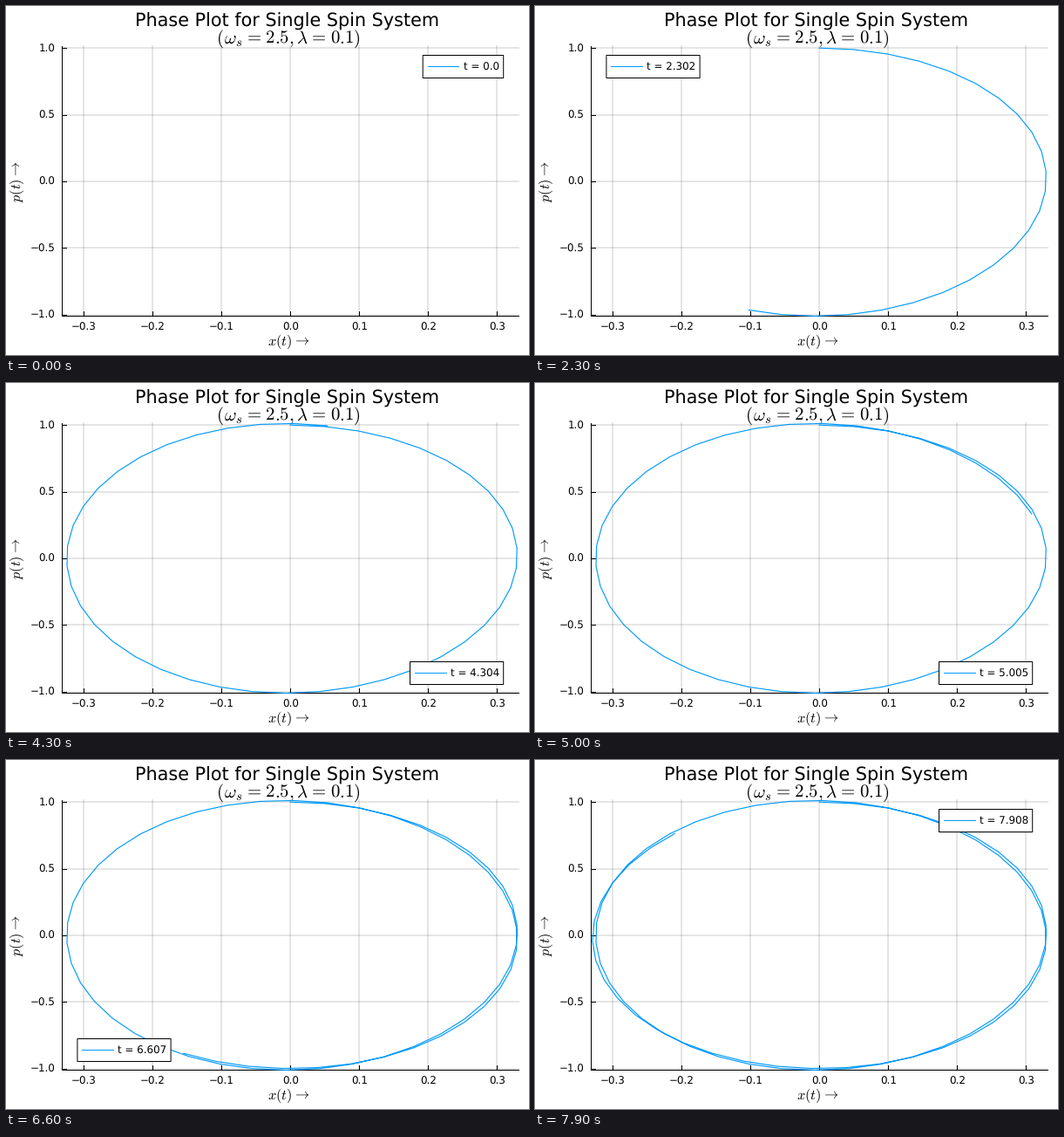
Recreate the animation shown at these times as a matplotlib script. Size 600 px wide and 400 px high, loop 8000 ms.

```python
import numpy as np
import matplotlib.pyplot as plt
from matplotlib.animation import FuncAnimation
from matplotlib.patches import Rectangle

FRAMES, INTERVAL = 80, 100
DT = 100 / 999
BLUE = "#009afa"
PX = 0.72  # points per pixel at 100 dpi
SMALL, MEDIUM, LARGE = 11.85 * PX, 16.3 * PX, 20.74 * PX
LEFT, RIGHT, TOP, BOTTOM = 64, 588, 46, 355

plt.rcParams["font.family"] = "DejaVu Sans"
plt.rcParams["mathtext.fontset"] = "cm"
plt.rcParams["text.hinting"] = "none"


def to_x(x):
    return 326.25 + 790 * x


def to_y(p):
    return 200.9 - 152.7 * p


def orbit(t):
    """Oscillator at 1.5 rad/s with a weak response at the spin frequency."""
    x = 0.328 * np.sin(1.5 * t) + 0.0031 * np.sin(2.5 * t)
    p = 1.008 * np.cos(1.5 * t) - 0.008 * np.cos(2.5 * t)
    return to_x(x), to_y(p)


fig = plt.figure(figsize=(6, 4), dpi=100, facecolor="white")
ax = fig.add_axes([0, 0, 1, 1])
ax.set_xlim(0, 600)
ax.set_ylim(400, 0)
ax.axis("off")


def line(xs, ys, width=1.0, color="black", **kw):
    return ax.plot(xs, ys, color=color, lw=width * PX, **kw)[0]


def label(x, y, text, size, ha="center", **kw):
    return ax.text(x, y, text, size=size, ha=ha, va="baseline", **kw)


def number(v):
    return f"{v:.1f}".replace("-", "\u2212")


# Grid, ticks and tick labels
for v in np.arange(-3, 4) / 10:
    x = to_x(v)
    line([x, x], [TOP, BOTTOM], 2, alpha=0.1, zorder=1)
    line([x, x], [BOTTOM, BOTTOM - 5], zorder=2)
    label(x, 371.6, number(v), SMALL)
for v in np.arange(-2, 3) / 2:
    y = to_y(v)
    line([LEFT, RIGHT], [y, y], 2, alpha=0.1, zorder=1)
    line([LEFT, LEFT + 5], [y, y], zorder=2)
    label(56.5, y + 4.3, number(v), SMALL, ha="right")
line([LEFT, LEFT], [TOP, BOTTOM], zorder=2)
line([LEFT, RIGHT], [BOTTOM, BOTTOM], zorder=2)

# Titles
GAP = r"\hspace{0.08}"
EQ = GAP + "=" + GAP
label(322.3, 24, "Phase Plot for Single Spin System", LARGE)
label(324.2, 42.8, rf"$({GAP}\omega_s{EQ}2.5, \lambda{EQ}0.1)$", LARGE)
label(300.5, 389, r"$x(t)\hspace{0.04}\rightarrow$", MEDIUM, ha="left")
label(16.5, 224.8, r"$p(t)\rightarrow$", MEDIUM, ha="left",
      rotation=90, rotation_mode="anchor")

curve = line([], [], 1.15, BLUE, zorder=4)

# Legend
box = Rectangle((0, 0), 1, 26, fc="white", ec="black", lw=PX, zorder=5,
                snap=False)
ax.add_patch(box)
key = line([], [], 1.0, BLUE, zorder=6)
clock = label(0, 0, "", SMALL, ha="left", zorder=6)

# First step at which the legend sits in each corner
CORNERS = [(0, "top right"), (4, "top left"), (38, "bottom right"),
           (56, "bottom left"), (67, "top left"), (78, "top right")]


def place_legend(n):
    corner = [c for start, c in CORNERS if n >= start][-1]
    width = 107.2 if n else 92.5
    left = 81.9 if "left" in corner else 570.7 - width
    top = 56.5 if "top" in corner else 319.5
    box.set_xy((left, top))
    box.set_width(width)
    key.set_data([left + 5.5, left + 41], [top + 12.5, top + 12.5])
    clock.set_position((left + 46.4, top + 16.9))
    clock.set_text(f"t = {round(n * DT, 3)}")


def update(n):
    curve.set_data(*orbit(np.arange(n + 1) * DT))
    place_legend(n)
    return curve, box, key, clock


anim = FuncAnimation(fig, update, frames=FRAMES, interval=INTERVAL,
                     repeat=True, repeat_delay=0, blit=False)
plt.show()
```
